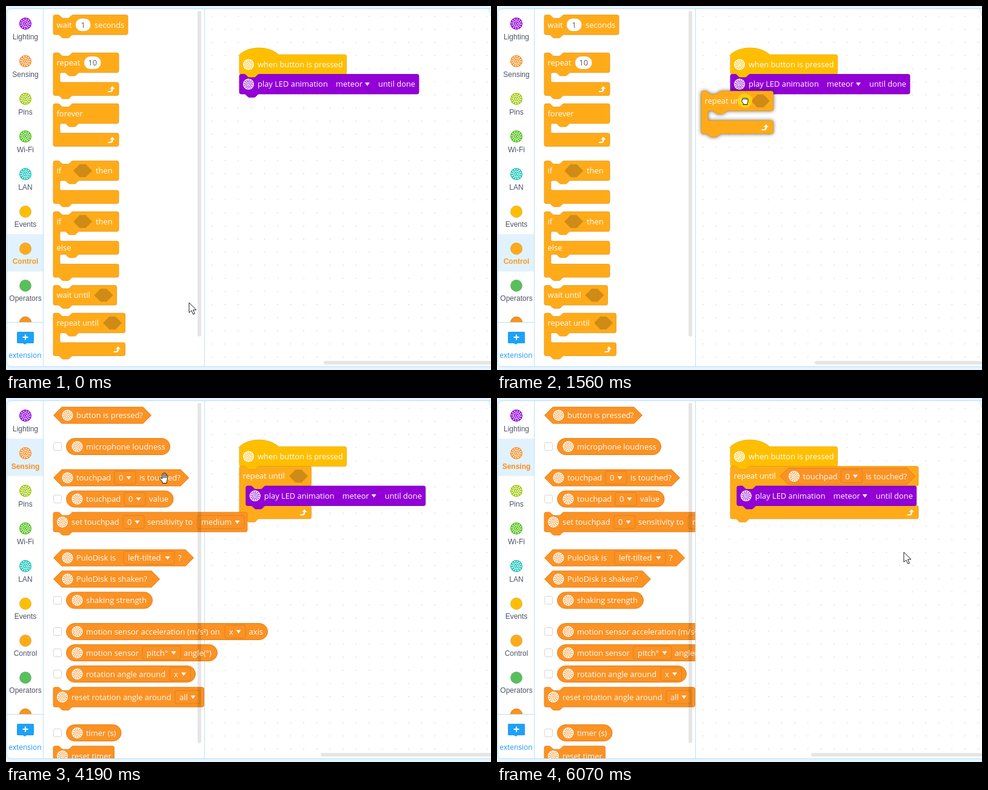
These frames come from a looping animation (800x600 px, 6.62 s). An HTML page:

```html
<!DOCTYPE html>
<html lang="en">
<head>
<meta charset="utf-8">
<title>Block editor</title>
<style>
html, body { margin: 0; width: 100%; height: 100%; overflow: hidden; background: #e6f4fe; }
svg { display: block; }
text { font: 12.9px "Open Sans", "Noto Sans", sans-serif; fill: #fff; white-space: pre; }
.nav text { font: 12px "Liberation Sans", Arial, sans-serif; fill: #4b5667; text-anchor: middle; }
.nav .on text { font-weight: bold; fill: var(--tint); }
.nav rect { fill: none; }
.nav .on rect { fill: #e1f2fd; }
.nav text.ext { font: 12px "Open Sans", sans-serif; fill: #2397f3; }
.num { fill: #575e75; text-anchor: middle; }
.lift { filter: drop-shadow(0 0 3px rgba(0, 0, 0, .6)); }
.line { stroke: #bcdff6; fill: none; }
.hidden { display: none; }
</style>
</head>
<body>
<svg id="stage" width="800" height="600" viewBox="0 0 800 600"></svg>
<script>
const LOOP = 6620;
const S = .675; // workspace zoom
const HALF = 16.2;

const CONTROL = ['#ffab19', '#e8981a'];
const EVENTS = ['#ffbf00', '#e8ae00'];
const LIGHT = ['#9200d6', '#7c00ba'];
const SENSE = ['#fb9224', '#e3801a'];

const $ = id => document.getElementById(id);

// Block outlines
const NOTCH = 'c2 0 3 1 4 2l4 4c1 1 2 2 4 2h12c2 0 3-1 4-2l4-4c1-1 2-2 4-2';
const TAB = 'c-2 0-3 1-4 2l-4 4c-1 1-2 2-4 2h-12c-2 0-3-1-4-2l-4-4c-1-1-2-2-4-2';

function outline(w, { mouths = [], hat = false, tab = true } = {}) {
  const W = w / S, right = `H${W - 4}a4 4 0 0 1 4 4`, turn = 'a4 4 0 0 1-4 4';
  let d = (hat ? 'M0 4V0c25-22 71-22 96 0' : 'M0 4a4 4 0 0 1 4-4h8' + NOTCH) + right + 'v40' + turn;
  for (const h of mouths)
    d += `H64${TAB}h-8a4 4 0 0 0-4 4v${h - 8}a4 4 0 0 0 4 4${right}v24${turn}`;
  return d + (tab ? 'H48' + TAB : '') + 'H4a4 4 0 0 1-4-4z';
}

// Parts inside blocks; y = 0 is the middle of the first row
const text = (x, s, y = 0) => `<text x="${x}" y="${y + 4.5}">${s}</text>`;
const slot = x => `<path d="M${x} 0l10.5-10.7h10l10.5 10.7-10.5 10.7h-10z" fill="#cf8b17"/>`;
const pill = (x, w, s) => `<rect x="${x}" y="-10.8" width="${w}" height="21.6" rx="10.8" fill="#fff" stroke="#e8981a" stroke-width=".7"/>
  <text class="num" x="${x + w / 2}" y="4.5">${s}</text>`;
const caret = x => `<path d="M${x - 4}-2.5h8l-4 5.5z" fill="#fff"/>`;
const menu = (x, w, s) => `<rect x="${x}" y="-10.8" width="${w}" height="21.6" rx="3" fill="none" stroke="${SENSE[1]}"/>` +
  text(x + 7, s) + caret(x + w - 11.5);
const loopArrow = (x, y) => `<path transform="translate(${x} ${y})" d="M-6 4.5h4q4.500 4.500-5.500h3l-4.300-4.500-4.300 4.500h2.800q0 3.200-2.600 3.400h-3z" fill="#fff"/>`
  .replace(/d="[^"]*"/, 'd="M-6 5H-2Q2.600 5 2.600 -.5H5.400L1.300-5L-2.700-.5H0Q0 2.800-2.500 3L-6 3.200z"');

function ring(x, y, r, fg, bg) {
  const circle = (k, extra) => `<circle r="${r * k}" fill="none" stroke="${bg}" ${extra}/>`;
  const seg = 2 * Math.PI * r * .74 / 24;
  return `<g transform="translate(${x} ${y})"><circle r="${r}" fill="${fg}"/>` +
    circle(.74, `stroke-width="${r * .2}" stroke-dasharray="${seg}"`) +
    circle(.47, `stroke-width="${r * .12}"`) +
    circle(.2, `stroke-width="${r * .16}" stroke-dasharray="1.2 .8"`) + '</g>';
}

const place = (x, y, inner, attrs = '') => `<g transform="translate(${x} ${y})" ${attrs}>${inner}</g>`;

function stackBody(w, [fill, edge], parts, opts = {}) {
  return `<path transform="translate(0 ${-HALF}) scale(${S})" d="${outline(w, opts)}" fill="${fill}" stroke="${edge}" stroke-width="1.3"/>` + parts;
}
const mouthBody = (w, parts, opts) => stackBody(w, CONTROL, parts, opts);
const chip = (d, parts) => `<path d="${d}" fill="${SENSE[0]}" stroke="${SENSE[1]}"/>` + parts;
const hexBody = (w, parts) => chip(`M13.500-13.500H${w - 13.5}L${w} 0L${w - 13.5} 13.500H13.500L0 0z`, ring(23, 0, 9, '#fff', SENSE[0]) + parts);
const pillBody = (w, parts) => chip(`M13.500-13.500H${w - 13.5}a13.500 13.500 0 0 1 0 27H13.500a13.500 13.500 0 0 1 0-27z`, ring(18, 0, 9, '#fff', SENSE[0]) + parts);

const hex = (y, w, parts) => place(78.5, y, hexBody(w, parts));
const reporter = (y, w, parts) =>
  `<rect x="78.500" y="${y - 6.5}" width="13" height="13" rx="2.500" fill="#fff" stroke="#d5d5d5"/>` + place(99.5, y, pillBody(w, parts));
const command = (y, w, parts) => place(78, y, stackBody(w, SENSE, ring(15, 0, 9, '#fff', SENSE[0]) + parts));

const repeatUntil = mouthBody(118.5, text(5.5, 'repeat until') + slot(82) + loopArrow(105.5, 43.5), { mouths: [24] });
const touched = hexBody(223, text(37.5, 'touchpad') + menu(100.5, 35, '0') + text(141.5, 'is touched?'));

const controlBlocks = [
  [31, stackBody(123, CONTROL, text(5.5, 'wait') + pill(36.5, 25.5, '1') + text(68, 'seconds'))],
  [93.5, mouthBody(108, text(5.5, 'repeat') + pill(50.5, 28.5, '10') + loopArrow(96, 43.5), { mouths: [24] })],
  [177.3, mouthBody(108, text(5.5, 'forever') + loopArrow(96, 43.5), { mouths: [24], tab: false })],
  [271.5, mouthBody(108, text(5.5, 'if') + slot(33) + text(70, 'then'), { mouths: [24] })],
  [355.3, mouthBody(108, text(5.5, 'if') + slot(33) + text(70, 'then') + text(5.5, 'else', 43), { mouths: [24, 24] })],
  [476.8, stackBody(104.5, CONTROL, text(5.5, 'wait until') + slot(67.5))],
  [522.5, repeatUntil]
].map(([y, body]) => place(78, y, body)).join('');

const senseBlocks =
  hex(28.5, 161, text(37.5, 'button is pressed?')) +
  reporter(80, 171, text(32.5, 'microphone loudness')) +
  place(78.5, 131.5, touched) +
  reporter(166.5, 176.5, text(32.5, 'touchpad') + menu(95.5, 35, '0') + text(136.5, 'value')) +
  command(204.5, 320, text(30, 'set touchpad') + menu(115, 35, '0') + text(155, 'sensitivity to') + menu(237, 78, 'medium')) +
  hex(263.5, 231, text(37.5, 'PuloDisk is') + menu(115.5, 84, 'left-tilted') + text(205.5, '?')) +
  hex(298.5, 175, text(37.5, 'PuloDisk is shaken?')) +
  reporter(333.5, 142, text(32.5, 'shaking strength')) +
  reporter(385, 332, text(32.5, 'motion sensor acceleration (m/s²) on') + menu(261.5, 34, 'x') + text(301, 'axis')) +
  reporter(420, 249, text(32.5, 'motion sensor') + menu(125.5, 63, 'pitch°') + text(193.5, 'angle(°)')) +
  reporter(455, 213, text(32.5, 'rotation angle around') + menu(170.5, 34.5, 'x')) +
  command(493, 248.5, text(30, 'reset rotation angle around') + menu(201, 41, 'all')) +
  reporter(552, 90.5, text(32.5, 'timer (s)')) +
  command(590, 100.5, text(30, 'reset timer'));

// Category bar: name, colour, icon y, ringed icon
const categories = [
  ['Lighting', '#8f00d6', 29, 1], ['Sensing', '#f5902a', 91, 1], ['Pins', '#a0c80c', 153, 1],
  ['Wi-Fi', '#4cc012', 215, 1], ['LAN', '#1cc4b8', 277, 1], ['Events', '#ffbf00', 339],
  ['Control', '#ffab19', 400], ['Operators', '#57c05c', 461]
].map(([name, color, y, ringed]) => `<g id="cat${name}" style="--tint:${name === 'Control' ? '#fb9a1c' : '#f98d1e'}">
  <rect x="2" y="${y - 24}" width="59" height="61.500"/>` +
  (ringed ? ring(32, y, 10, color, '#fff')
    : `<circle cx="32" cy="${y}" r="9.700" fill="${color}" stroke="#000" stroke-opacity=".13"/>`) +
  `<text x="32" y="${y + (ringed ? 26 : 25)}">${name}</text></g>`).join('');

const OPEN = 'M-3.500 1V-5.500a1.100 1.100 0 0 1 2.200 0V-7.500a1.100 1.100 0 0 1 2.200 0V-6.500a1.100 1.100 0 0 1 2.200 0V-4a1.100 1.100 0 0 1 2.200 0C5.500 2 5 4 4 6V8.500H-3V6.500L-7 1.500C-8-.5-6-1.500-5 0Z';
const CLOSED = 'M-3.800-2a1.300 1.300 0 0 1 2.300-1.600a1.300 1.300 0 0 1 2.300 0a1.300 1.300 0 0 1 2.300.4a1.300 1.300 0 0 1 2 1.400C5.200 2 4.500 3.500 3.800 4.500V6.500H-2.800V4.500C-4 3-6 1-5.500-.5Q-5-1.600-3.800-.8Z';

$('stage').innerHTML = `
<defs>
  <clipPath id="flyClip"><rect id="flyRect" x="62" y="5" width="265" height="589"/></clipPath>
  <clipPath id="navClip"><rect x="2" y="5" width="59" height="516"/></clipPath>
  <pattern id="dots" x="329" y="6" width="21.600" height="21.600" patternUnits="userSpaceOnUse">
    <circle cx="11" cy="11" r=".9" fill="#d9d9d9"/></pattern>
</defs>
<rect width="800" height="600" fill="#e6f4fe"/>
<rect class="line" x="1.500" y="4.500" width="820" height="590" rx="7" style="fill:#fff"/>
<rect x="328" y="5" width="472" height="589" fill="url(#dots)"/>
<path class="line" d="M795.500 4.500q3 4 4.500 12"/>
<rect id="hbar" y="585" width="320" height="6" rx="3" fill="#e6e6e6"/>
<path class="line" d="M327.500 5V594"/>
${place(385, 96.4, stackBody(176.5, EVENTS, ring(15, 0, 9, '#fff', EVENTS[0]) + text(30, 'when button is pressed'), { hat: true }))}
<path id="ghost" transform="translate(385 112.600) scale(${S})" d="${outline(118.5, { mouths: [48] })}" opacity=".2"/>
<g id="loop" transform="translate(385 128.800)">
  ${mouthBody(118.5, text(5.5, 'repeat until') + slot(82) + `<g id="loopIcon">${loopArrow(0, 59.7)}</g>`, { mouths: [48] })}
</g>
<g id="play">${stackBody(296, LIGHT, ring(15, 0, 9, '#fff', LIGHT[0]) + text(30, 'play LED animation') +
  text(159, 'meteor') + caret(211) + text(229, 'until done'))}</g>
<g clip-path="url(#flyClip)">
  <g id="controlSet">${controlBlocks}</g>
  <g id="senseSet">${senseBlocks}</g>
</g>
<rect id="vbar" x="316" y="8" width="6" rx="3" fill="#000" opacity=".1"/>
<g class="nav">
  <g clip-path="url(#navClip)">${categories}<circle cx="32" cy="522" r="9.700" fill="#f8931f" stroke="#d97f17"/></g>
  <path class="line" d="M61.500 5V594M2 521.500H61"/>
  <path d="M19.500 537h25q1.500 0 1.500 1.500v16q0 1.500-1.500 1.500H34l-3 2-3-2h-8.500q-1.500 0-1.500-1.500v-16q0-1.500 1.500-1.500z" fill="#1ea1f7"/>
  <path d="M32 541.500v9M27.500 546h9" stroke="#fff" stroke-width="2"/>
  <text class="ext" x="31.500" y="580">extension</text>
</g>
<rect id="dim" x="2" y="5" width="325" height="589" opacity=".066"/>
<g id="dragLoop" class="lift">${repeatUntil}</g>
<g id="dragHex">${touched}</g>
<g id="cursor">
  <circle id="glow" r="12" fill="#fbe800" opacity=".62"/>
  <path id="arrow" d="M0 0V16.500L3.900 13L6.700 19.300L9.400 18.100L6.600 12H11.800z" fill="#fff" stroke="#1c1c2b"/>
  <g fill="#fff" stroke="#111" stroke-linejoin="round">
    <path id="open" d="${OPEN}M-1.300-5.500V0M.9-6.500V0M3.100-4V0"/>
    <path id="closed" d="${CLOSED}M-1.500-3.600v2M.8-3.600v2M3.100-3.200v2"/>
  </g>
  <path id="cross" d="M1.500 4.500l6 6.500m0-6.500l-6 6.500" stroke="#e8641c" stroke-width="1.800"/>
</g>`;

// Screen updates: start, end, number of steps
const RUNS = [[0, 0, 1], [170, 820, 8], [900, 1560, 8], [1640, 1740, 2], [1920, 2200, 4], [2400, 2790, 5],
  [3070, 3070, 1], [3330, 3990, 8], [4090, 4740, 8], [4850, 5330, 6], [5520, 5520, 1], [5690, 6070, 5]];

function snapTime(t) {
  const [a, b, n] = RUNS.filter(r => r[0] <= t).pop();
  if (n === 1 || t >= b) return b;
  const step = (b - a) / (n - 1);
  return a + Math.floor((t - a) / step) * step;
}

// Waypoints: time, x, y
const pointer = [[0, 302, 489], [170, 288, 490], [500, 188, 510], [820, 142, 528], [900, 190, 518], [994, 250, 504],
  [1090, 300, 455], [1183, 336, 395], [1277, 366, 320], [1466, 401, 195], [1560, 409, 156], [1740, 417, 130],
  [2200, 435, 117], [2400, 435, 117], [2500, 330, 113], [2690, 60, 98], [2790, 38, 95], [3070, 95, 132],
  [3330, 110, 131], [3990, 261, 132], [4190, 261, 132], [4275, 268, 133], [4370, 290, 135], [4740, 462, 146],
  [4850, 504, 147], [4950, 550, 146], [5330, 655, 141], [5690, 662, 138], [6070, 671, 254]];
const loopPath = [[900, 78, 522.5], [994, 83.5, 524.5], [1090, 180, 496], [1183, 235, 441], [1277, 280, 361],
  [1466, 325, 206], [1560, 337, 156.5], [1640, 349, 136], [1740, 345, 122], [1920, 352, 113], [2107, 368, 110]];
const hexPath = [[4275, 79, 131.5], [4370, 92, 132], [4740, 244, 138], [4850, 301, 141.5], [5330, 465, 138], [5520, 466, 136]];

function at(path, t) {
  const i = path.findIndex(p => p[0] > t);
  if (i < 0) return path.at(-1).slice(1);
  if (i === 0) return path[0].slice(1);
  const [t0, x0, y0] = path[i - 1], [t1, x1, y1] = path[i];
  const k = (t - t0) / (t1 - t0);
  return [x0 + (x1 - x0) * k, y0 + (y1 - y0) * k];
}

const show = (id, on) => $(id).classList.toggle('hidden', !on);
const move = (id, x, y) => $(id).setAttribute('transform', `translate(${x} ${y})`);
const size = (id, name, value) => $(id).setAttribute(name, value);
const loopShape = $('loop').querySelector('path');

function draw(now) {
  const t = snapTime(now);
  const [x, y] = at(pointer, t);
  const dragLoop = t >= 890 && t < 2190, dragHex = t >= 4270 && t < 5680;
  const dragging = dragLoop || dragHex;
  const held = dragging || (t > 810 && t < 890);
  const sensing = t >= 2780, placed = t >= 2190, joined = t >= 5680;

  // Workspace
  const shifted = t >= 1910;
  move('play', shifted ? 395.8 : 385, shifted ? 161.3 : 128.8);
  show('ghost', shifted && !placed);
  show('loop', placed);
  const w = joined ? 310 : 118.5;
  loopShape.setAttribute('d', outline(w, { mouths: [48] }));
  move('loopIcon', w - 12.5, 0);
  size('hbar', 'x', joined ? 518 : t >= 2390 ? 519 : 524);

  // Palette
  show('controlSet', !sensing);
  show('senseSet', sensing);
  $('catSensing').classList.toggle('on', sensing);
  $('catControl').classList.toggle('on', !sensing);
  size('vbar', 'height', sensing ? 561 : 537);
  size('flyRect', 'width', t >= 3060 && t < 4270 ? 738 : 265);
  const discard = dragging && x < 327;
  show('dim', discard);

  // Dragged blocks
  show('dragLoop', dragLoop);
  move('dragLoop', ...at(loopPath, t));
  show('dragHex', dragHex || joined);
  move('dragHex', ...(joined ? [467, 129] : at(hexPath, t)));
  $('dragHex').classList.toggle('lift', dragHex);

  // Pointer
  const overBlock = (t > 400 && t < 890 && x < 197) || (t >= 2190 && t < 2450) ||
    (t >= 3060 && t < 4270) || (joined && y < 150);
  move('cursor', x, y);
  show('glow', held);
  show('closed', held);
  show('open', !held && overBlock);
  show('arrow', !held && !overBlock);
  show('cross', discard);
}

function tick() {
  draw(performance.now() % LOOP);
  requestAnimationFrame(tick);
}
tick();
</script>
</body>
</html>
```
